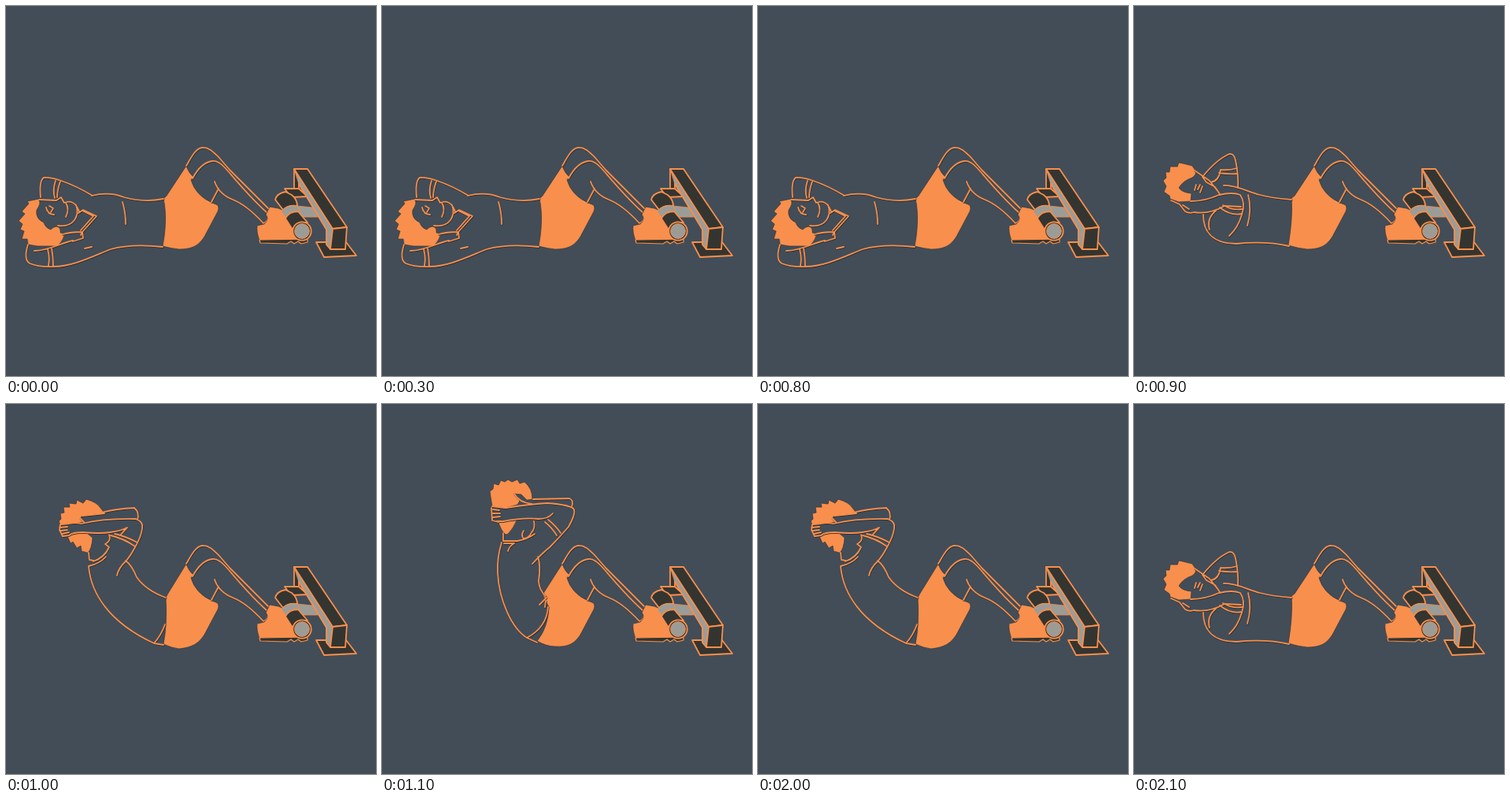
An HTML page that plays this animation: 470 px wide and 470 px high, repeating every 2200 ms.

```html
<!DOCTYPE html>
<html lang="en">
<head>
<meta charset="utf-8">
<title>Sit-up</title>
<style>
  html, body { margin: 0; width: 100%; height: 100%; overflow: hidden; background: #424d58; }
  svg { display: block; width: 100%; height: 100%; }
  path, circle { stroke-linecap: round; stroke-linejoin: round; }
  .shade { fill: none; stroke: #22262a; stroke-width: 2.1; transform: translate(.4px, .6px); }
  .line { fill: none; stroke: #f98f4c; stroke-width: 1.8; }
  .solid { fill: #f98f4c; stroke: #35373a; stroke-width: .7; }
  .dark { fill: #343530; stroke: #f98f4c; stroke-width: 1.8; }
  .grey { fill: #9c9c97; stroke: #f98f4c; stroke-width: .8; }
</style>
</head>
<body>
<svg viewBox="0 0 470 470">
  <g id="poses"></g>
  <g id="legs"></g>
  <g id="bench">
    <path class="dark" d="M354 232H372L383 242L362 243Z"/>
    <path class="dark" d="M394 300H432L445 317L404 319Z"/>
    <path class="dark" d="M366 207L372 216V232H366Z"/>
    <path class="grey" d="M366 207L372 226L407 284V303L412 309L415 283Z"/>
    <path class="dark" d="M366 207L383 207L433 281L415 283Z"/>
    <path class="dark" d="M415 283L433 281L431 309H412Z"/>
    <path class="line" d="M372 226L407 284V303L412 309"/>
    <path class="solid" d="M330 265L335 255L346 257L358 262L386 290L383 298H322Q318 287 319 279L328 277Q335 270 330 265Z"/>
    <path class="dark" d="M322 297L323 301L357 302L362 299L366 302L371 299L375 302L383 300L383 296Z" style="stroke-width:1.2"/>
    <path class="grey" d="M370 254L389 256L396 268L374 268Z"/>
    <path class="dark" d="M342 246Q344 238 355 236L363 240Q370 246 370 254Q358 252 352 259Z"/>
    <path class="grey" d="M350 261Q355 252 370 254L373 260Q360 261 356 269Z"/>
    <path class="dark" d="M355 270Q359 261 371 261L383 275Q370 274 364 284Z"/>
    <circle class="dark" cx="376" cy="286" r="11.7"/>
    <circle class="grey" cx="376" cy="286" r="9.5"/>
  </g>
</svg>
<script>
const LOOP = 2200;

// Every pose shares the right side of the shorts; "hip" closes the left side.
const SHORTS = 'C237 309 245 304 252 293L269 261Q271 257 269 253L262 250Q241 241 235 221L238 217Q232 212 229 203Z';

const LEGS = `M229 203C236 191 241 181 249 180C258 179 265 187 271 193L284 208L334 258
  M237 219C244 206 253 198 262 197C270 196 277 204 284 212C296 226 313 246 331 262
  M265 223C269 235 278 242 288 246C301 251 315 263 327 276M270 232L261 249M327 276Q334 274 333 264`;

const POSES = {
  lying: {
    hair: `M42 245L27 248L29 251L20 261L24 264L16 273L21 277L18 284L23 286L20 296L27 296L28 303L40 305
      L66 305Q73 297 75 289L69 288Q70 281 64 280Q59 281 57 284Q50 282 48 275Q37 270 39 259Q45 251 42 245Z`,
    hip: 'M229 203L204 241L200 245C204 262 203 285 199 305Q210 308 220 309',
    lines: `M44 243Q42 222 48 218Q55 217 70 222C88 228 100 235 110 241
      M109 241C125 237 140 239 150 243C168 248 185 248 200 245
      M63 222Q59 234 62 244M69 223Q65 234 65 243M42 246L64 247L70 243L74 250Q82 246 89 253Q93 263 87 272Q80 281 66 279
      M55 254L60 257L57 262M51 256Q53 265 61 265M76 250Q81 258 76 268
      M88 252Q95 262 92 263L98 259L115 267L97 287L95 291M97 260L111 267L95 285
      M72 290Q82 287 97 287M97 287L98 295L85 299
      M28 303Q22 322 30 327Q42 332 60 331C85 331 110 318 133 309C155 303 180 304 199 306
      M36 311C55 311 72 300 85 298M53 309Q56 320 54 330M58 308Q60 318 60 330
      M148 249Q152 262 152 277M100 308L109 306`
  },
  low: {
    hair: `M57 199L62 200L74 203L78 209Q80 214 74 218Q62 222 57 231Q61 237 73 238L72 248L57 249L46 245
      L45 241L38 236L41 229L37 222L41 218L40 211L45 211L46 204L55 204Z`,
    hip: 'M229 203L204 241L200 244Q202 268 196 304Q209 308 220 309',
    lines: `M87 217Q105 195 121 188Q127 187 129 196Q133 215 132 231M110 208Q122 209 131 206M108 212Q120 214 131 213
      M87 217L92 224L103 230L109 239M110 208Q108 222 98 224M77 209L96 222L107 236
      M84 227L81 233M87 229L84 237M79 227L77 234
      M72 248Q90 248 108 240Q125 236 135 240Q142 250 137 265Q132 282 121 292
      M47 247L58 252L65 261Q70 264 76 262Q96 265 115 254L136 255M62 253L70 258
      M109 256Q123 267 137 264M113 253Q125 260 137 258M104 260Q92 270 96 284
      M88 265C88 285 98 302 130 302C150 300 175 300 197 305
      M114 228C128 227 145 236 160 240C175 244 188 245 200 246M145 240Q150 258 144 279`
  },
  high: {
    hair: `M69 153L67 149L70 146L69 139L74 138L73 131L81 131L80 126L89 127L90 122L98 126L102 121Q116 125 120 132
      Q124 137 125 139L97 142L94 145L99 150L92 151L80 152Z
      M78 168L82 177L85 175L90 183L95 180L96 187L104 189Q109 184 110 170L103 164L84 164Z`,
    hip: 'M229 203L205 242L203 246Q205 280 200 305Q211 310 220 311',
    lines: `M121 138Q140 133 163 132Q170 138 167 147M97 142L125 139M94 145L99 150
      M80 152Q88 150 96 152Q125 145 165 146Q175 150 173 158Q172 168 164 182Q158 193 152 200Q143 208 141 218
      M80 167Q84 163 98 163Q120 165 132 163Q147 161 154 157Q150 161 145 167
      M69 153L80 152M68 157L78 156M69 161L78 160M71 165L80 163M69 153L68 160L72 168L80 167
      M133 167Q150 171 164 181M138 165Q152 168 167 176
      M131 166Q134 174 126 178L131 182Q125 195 111 200M105 189L106 198L111 199M105 206Q119 203 127 194
      M105 206C108 240 130 277 188 304L200 306M202 280Q197 294 188 304
      M152 199Q160 205 166 220Q178 237 203 246`
  },
  up: {
    hair: `M140 130L138 118L137 111L141 108L142 101L148 103L151 97L156 99L160 96L165 99L172 96L175 101L181 99
      Q191 107 191 121L184 122L177 115L168 114L175 123L172 128L157 132Z
      M147 149L152 160Q157 168 160 165Q167 158 171 148Z`,
    hip: 'M229 203L204 242L212 258Q211 284 197 301Q209 308 220 308',
    lines: `M192 121L238 120Q244 122 241 131M168 114Q174 125 190 127
      M140 130L157 132Q190 127 210 126Q240 128 244 134Q246 140 237 156Q225 170 213 182Q203 190 191 203
      M146 149L154 149Q180 144 199 146Q211 146 217 139
      M139 132L140 148L148 150M141 134L149 135M140 139L150 139M141 144L150 143
      M207 150Q216 157 222 167M211 147Q222 156 227 164
      M193 149Q195 158 190 163Q187 170 180 171Q176 167 180 161M154 164L154 174
      M155 174L172 174Q184 172 194 165M155 177L168 177Q162 180 160 187
      M152 176Q146 195 147 215C149 250 165 285 184 297M211 258Q209 284 184 297L197 303
      M198 194Q202 205 199 225Q200 237 208 244M209 246L200 255M208 250L207 258`
  }
};

const stroke = d => `<path class="shade" d="${d}"/><path class="line" d="${d}"/>`;
const solid = d => `<path class="solid" d="${d}"/>`;

document.getElementById('legs').innerHTML = stroke(LEGS);
document.getElementById('poses').innerHTML = Object.entries(POSES).map(([name, pose]) =>
  `<g id="${name}">${solid(pose.hair)}${solid(pose.hip + SHORTS)}${stroke(pose.lines)}</g>`).join('');

function poseAt(time) {
  if (time < 900) return 'lying';
  if (time < 1000 || time >= 2100) return 'low';
  if (time < 1100 || time >= 2000) return 'high';
  return 'up';
}

const start = performance.now();

function draw() {
  const current = poseAt((performance.now() - start) % LOOP);
  for (const name in POSES) {
    document.getElementById(name).style.display = name === current ? '' : 'none';
  }
  requestAnimationFrame(draw);
}
draw();
</script>
</body>
</html>
```
